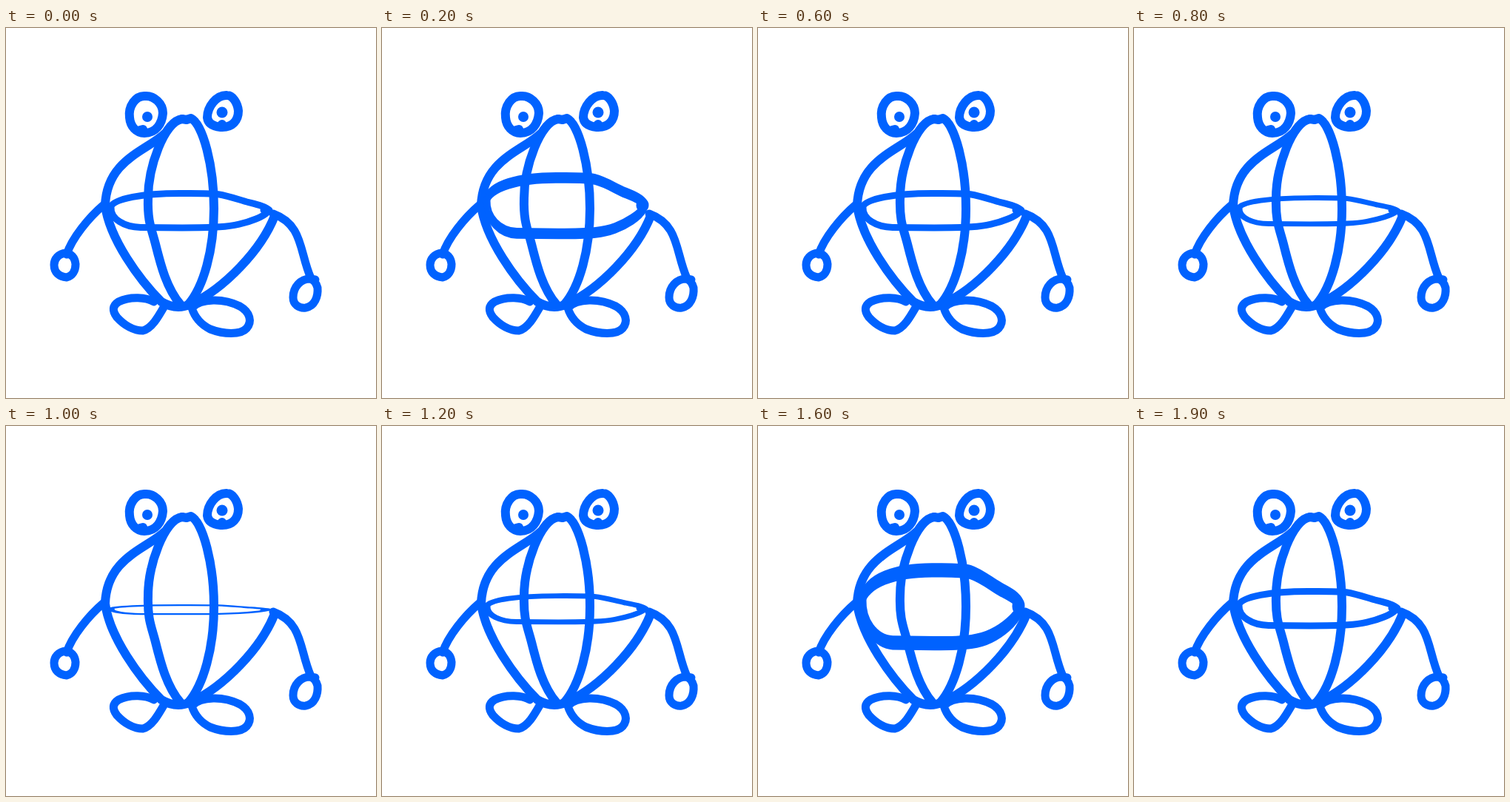
These frames come from a looping animation (500x500 px, 2000 ms). An HTML page:

```html
<!DOCTYPE html>
<html lang="en">
<head>
<meta charset="utf-8">
<title>Mouth</title>
<style>
  html, body { margin: 0; width: 100%; height: 100%; overflow: hidden; background: #fff; }
  svg { display: block; width: 100vw; height: 100vh; }
</style>
</head>
<body>
<svg viewBox="0 0 500 500" fill="none" stroke="#0062ff" stroke-width="12" stroke-linecap="round" stroke-linejoin="round">
  <!-- eyes -->
  <path d="M188 92C175 91 165 106 167 121C168 133 176 142 187 142C203 142 211 129 212 115C212 102 200 91 188 92ZM181 138L185 137"/>
  <path d="M299 91C284 90 272 107 272 121C273 129 280 133 290 134C306 135 314 125 314 112C313 101 306 91 299 91ZM291 131L292 130"/>
  <g fill="#0062ff" stroke="none">
    <circle cx="191" cy="120" r="7"/>
    <circle cx="292" cy="114" r="7.5"/>
  </g>
  <!-- body -->
  <path d="M238 123C214 126 192 188 192 230C191 262 197 272 202 292C209 320 217 352 236 374"/>
  <path d="M238 123L244 124L250 122C266 130 281 186 281 244C281 300 267 350 246 374"/>
  <path d="M214 143C190 166 136 178 134 240C140 285 180 340 210 370Q230 382 250 373C295 352 345 300 363 254"/>
  <!-- arms and hands -->
  <g stroke-width="11">
    <path d="M132 239C112 256 89 284 82 306"/>
    <path d="M81 304C71 305 65 312 65 320C65 331 72 336 82 337C90 335 94 328 94 319C93 310 88 305 81 304Z"/>
    <path d="M361 251C402 266 396 302 412 338"/>
    <path d="M418 340L411 339C398 339 388 350 388 364C388 374 396 379 405 378C417 376 422 363 421 351C419 344 415 340 411 339"/>
  </g>
  <!-- feet -->
  <g stroke-width="11">
    <path d="M200 370C190 364 168 362 152 370C144 375 143 382 150 391C160 402 173 409 185 409C197 406 206 390 214 376"/>
    <path d="M251 378C264 365 294 365 316 376C330 384 333 397 325 406C317 415 294 414 276 407C262 400 255 391 251 378Z"/>
  </g>
  <!-- mouth, drawn around its own middle line -->
  <g id="mouth" stroke-width="9">
    <path d="M141 -4C146 -16 185 -22.7 235 -22.7C260 -22.7 275 -23 287 -21.5C303 -19 316 -13.5 328 -10.5S351 -5 356 0"/>
    <path d="M142 -4C141 12 160 22.7 182 23.3L238 23.7C285 23.7 300 22.5 315 19S348 9 354 2L348 0"/>
  </g>
</svg>
<script>
  // Mouth poses: [middle y, vertical scale]
  const rest = [246.2, 1], open = [[243.8, 1.3], [239.4, 1.63], [243.2, 2.13]],
        shut = [[246.8, .76], [247.4, .5], [248, .26]];
  const swing = ([a, b, c]) => [a, b, c, b, a, rest];
  const poses = [rest, ...swing(open), rest, ...swing(shut), ...swing(open)];
  const step = 100;
  const mouth = document.getElementById('mouth');

  function draw(now) {
    const [y, scale] = poses[Math.floor(now / step) % poses.length];
    mouth.setAttribute('transform', `translate(0 ${y}) scale(1 ${scale})`);
  }

  const start = performance.now();
  function tick() {
    draw(performance.now() - start);
    requestAnimationFrame(tick);
  }
  tick();
</script>
</body>
</html>
```
